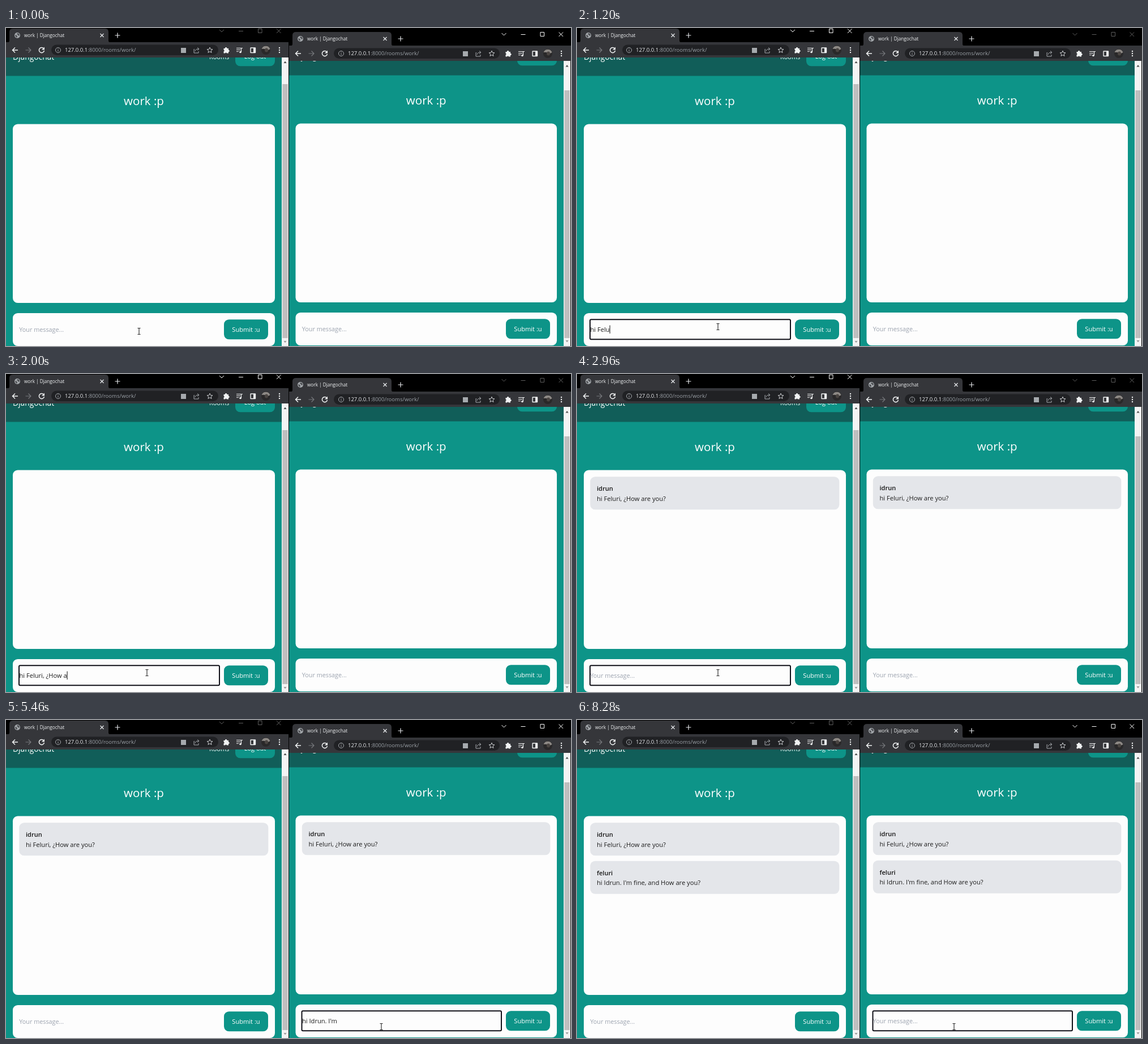
Write an HTML page that moves like this. It is 998 px wide and 561 px high and loops after 8.38 s.

```html
<!DOCTYPE html>
<html lang="en">
<head>
<meta charset="utf-8">
<title>Two chat windows</title>
<style>
  html, body { margin: 0; width: 100%; height: 100%; overflow: hidden; background: #000; }
  svg { display: block; width: 998px; height: 561px; }
  text { font-family: "Open Sans", "Noto Sans", sans-serif; white-space: pre; }
  .line { fill: none; stroke: currentColor; stroke-width: 1.2; }
</style>
</head>
<body>
<svg id="stage" viewBox="0 0 998 561" xmlns="http://www.w3.org/2000/svg"></svg>
<script>
const LOOP = 8380, BLINK = 225;
const TEAL = '#0d9488', DARK = '#115e59', PAPER = '#fdfdfd', BAR = '#35363a';
const LEFT_FOCUS = 360, RIGHT_FOCUS = 3540;

const messages = [
  { at: 2700, name: 'idrun', body: 'hi Feluri, ¿How are you?' },
  { at: 7600, name: 'feluri', body: "hi Idrun. I'm fine, and How are you?" }
];

// Typing bursts: first key, last key, characters
const leftKeys = [[640, 780, 'hi '], [920, 1460, 'Feluri, '], [1640, 2480, '¿How are you?']];
const rightKeys = [[3680, 3840, 'hi '], [4400, 4400, 'I'], [4740, 5220, "drun. I'm"], [5500, 5560, ' f'],
  [5620, 5900, 'ine'], [6320, 6490, ', and '], [6680, 7480, 'How are you?']];

const pointer = [[0, 235, 535], [120, 235, 535], [340, 249, 527], [3000, 249, 527],
  [3480, 663, 541], [7520, 663, 541], [7600, 666, 541]];

const rect = (x, y, w, h, fill, r = 0, more = '') =>
  `<rect x="${x}" y="${y}" width="${w}" height="${h}" rx="${r}" fill="${fill}" ${more}/>`;
const text = (x, y, size, fill, str, more = '') =>
  `<text x="${x}" y="${y}" font-size="${size}" fill="${fill}" ${more}>${str}</text>`;
const line = (d, more = '') => `<path class="line" d="${d}" ${more}/>`;
const group = (x, y, inner, more = '') => `<g transform="translate(${x} ${y})" ${more}>${inner}</g>`;

function chromeLeft(pillX, pillW) {
  return `<path d="M4 25Q6 25 6 22V7Q6 1 12 1H175Q181 1 181 7V22Q181 25 183 25Z" fill="${BAR}"/>` +
    '<circle cx="20" cy="13" r="5" fill="#a3a7ab"/>' +
    '<path d="M16 12l3 1 1 2-1 2q-3-2-3-5zM20 9l3 1 1 3-2 1-1-2-2-1z" fill="#4b4d51"/>' +
    text(32, 16, 8.2, '#f1f3f4', 'work | Djangochat') +
    line('M166.500 10l6 6m0-6l-6 6M192.500 13h9M197 8.500v9', 'color="#e8eaed"') +
    line('M21 39H11.500M16 34.500L11.500 39l4.500 4.500', 'color="#f1f3f4" style="stroke-width:1.5"') +
    line('M34.500 39H44M39.500 34.500L44 39l-4.500 4.500', 'color="#77797d"') +
    line('M66.500 36A4.600 4.600 0 1 0 67.500 40', 'color="#f1f3f4" style="stroke-width:1.5"') +
    '<path d="M68 33.500v5h-5z" fill="#f1f3f4"/>' +
    rect(pillX, 29.500, pillW, 18.500, '#202124', 9.250) +
    line('M87.500 39a4.500 4.500 0 1 0 9 0a4.500 4.500 0 1 0 -9 0M92 38.500v3M92 36v1.200', 'color="#a6aaae" style="stroke-width:1"') +
    text(104, 42.300, 9.5, '#e8eaed', '127.0.0.1<tspan fill="#9aa0a6">:8000/rooms/work/</tspan>');
}

function starPath(cx, cy) {
  const pts = Array.from({ length: 10 }, (_, i) => {
    const r = i % 2 ? 2.3 : 5.2, a = (i / 5 - 0.5) * Math.PI;
    return `${cx + r * Math.cos(a)} ${cy + r * Math.sin(a)}`;
  });
  return `M${pts.join('L')}Z`;
}

const chromeRight =
  rect(309, 35, 9, 9, '#a6aaae') +
  line('M333 37.500h-1v6.500h8v-3M334 41q.5-4 6-4M338 34.500l3 2.500-3 2.500', 'color="#a6aaae" style="stroke-width:1"') +
  line(starPath(360, 39.300), 'color="#c8cacd" style="stroke-width:1"') +
  '<path d="M384.500 36h2.500a1.700 1.700 0 1 1 3.300 0h2.700v2.700a1.700 1.700 0 1 1 0 3.400V44.500h-3a1.600 1.600 0 0 0-3 0h-2.500v-3a1.600 1.600 0 0 0 0-3z" fill="#f1f3f4"/>' +
  line('M407 35.500h8M407 38.500h7M407 41.500h4M415.500 42.500V35.500h2.500', 'color="#f1f3f4"') +
  '<circle cx="414" cy="42.500" r="1.800" fill="#f1f3f4"/>' +
  rect(432, 35, 8.5, 8.5, 'none', 0.5, 'stroke="#f1f3f4" stroke-width="1.400"') + rect(437, 35, 3.5, 8.5, '#f1f3f4') +
  '<circle cx="459" cy="39" r="8" fill="#292829"/><path d="M451.500 37a8 8 0 0 1 15 0q-3 3-7 1t-8-1z" fill="#8d8985"/>' +
  '<ellipse cx="460" cy="39" rx="3" ry="3.500" fill="#4a4542"/>' +
  [35, 39, 43].map(y => `<circle cx="483" cy="${y}" r="1.200" fill="#f1f3f4"/>`).join('');

const controls = line('M377 3l4 4 4-4M411 5.500h8M445.500 1.500h6.500v7h-6.500zM478 1.500l7.500 7.500m0-7.500L478 9', 'style="stroke-width:1"');

function scrollbar(x, top, thumbTop, arrowUp, arrowDown, w) {
  return rect(x, top, w, 561 - top, '#f4f4f4') + rect(x + 1.3, thumbTop, 9.5, 547 - thumbTop, '#bfbfbf') +
    `<path d="M${x + 3.5} ${arrowUp + 2}h5l-2.500-3.500z" fill="#4a4a4a"/>` +
    `<path d="M${x + 3.5} ${arrowDown - 2}h5l-2.500 3.500z" fill="#9a9a9a"/>`;
}

function page(id, x, w, dy, top) {
  const right = x + w, card = (m, i) => {
    const y = 181.3 + i * 67.5;
    return `<g id="${id}card${i}">` + rect(x + 11.3, y, w - 23, 58, '#e4e6ea', 8.7) +
      text(x + 23, y + 25, 11, '#151515', m.name, 'font-weight="600"') +
      text(x + 23, y + 42.3, 11.15, '#1c1c1c', m.body) + '</g>';
  };
  return group(0, dy,
    rect(x - 12, 50, w + 24, 512, TEAL) + rect(x - 12, 50, w + 24, 34.5, DARK) +
    text(x, 55.8, 13.8, '#fff', 'Djangochat') + text(right - 116, 54.5, 10.9, '#fff', 'Rooms') +
    rect(right - 70, 32, 70, 35.3, TEAL, 8.7) + text(right - 35, 54, 11, '#fff', 'Log out', 'text-anchor="middle"') +
    text(x + w / 2, 136, 20.5, '#fff', 'work :p', 'text-anchor="middle"') +
    rect(x, 169.5, w, 315.5, PAPER, 8.7) + messages.map(card).join('') +
    rect(x, 503, w, 58, PAPER, 8.7) +
    rect(right - 90, 514.3, 78, 35, TEAL, 8.7) +
    text(right - 51, 536, 11.1, '#fff', 'Submit :u', 'text-anchor="middle"') +
    text(x + 11.3, 536, 10.8, '#9ca3af', 'Your message...', `id="${id}hint"`) +
    text(x + 11.5, 536, 11.1, '#1c1c1c', '', `id="${id}typed"`) +
    rect(x + 11, 514.3, w - 109, 35, 'none', 2, `id="${id}ring" stroke="#101018" stroke-width="2"`) +
    rect(0, 524.5, 1, 14.5, '#111', 0, `id="${id}caret"`),
    '') + '';
}

document.getElementById('stage').innerHTML =
  '<defs><clipPath id="clipL"><rect y="52" width="499" height="509"/></clipPath>' +
  '<clipPath id="clipR"><rect x="500" y="58" width="498" height="503"/></clipPath></defs>' +
  rect(0, 0, 998, 561, '#000') +
  rect(0, 25, 499, 27.3, BAR) + chromeLeft(80, 295) + chromeRight + group(0, 0, controls, 'id="Lctl"') +
  '<g clip-path="url(#clipL)">' + page('L', 12, 463, 0, 52) + '</g>' + scrollbar(487, 52, 99, 60, 554, 12) +
  rect(500, 31, 498, 27.3, BAR) + group(500, 6, chromeLeft(79, 293)) + group(498, 6, chromeRight) +
  group(498.5, 6, controls, 'id="Rctl"') +
  '<g clip-path="url(#clipR)">' + page('R', 511.5, 461.5, -1, 58) + '</g>' + scrollbar(985, 58, 110, 66.5, 553, 12) +
  '<g id="tip"><path d="M100 477H153q3 0 3 3v23.500q0 3-3 3H118l-6 5.500-6-5.500h-6q-3 0-3-3V480q0-3 3-3z" fill="#4a5558"/>' +
  text(105, 495, 8.8, '#e4ecec', 'hello :D') + '</g>' +
  '<g id="mouse">' + line('M-2.500-5.500H-.8L0-5 .8-5.500H2.500M0-5V5M-2.500 5.500H-.8L0 5 .8 5.500H2.500', 'color="#222" style="stroke-width:1.100"') + '</g>';

const el = Object.fromEntries([...document.querySelectorAll('svg [id]')].map(n => [n.id, n]));
const show = (node, on) => node.setAttribute('visibility', on ? 'visible' : 'hidden');

function typedAt(keys, t) {
  let str = '', last = 0;
  for (const [from, to, chars] of keys) {
    if (t < from) break;
    const gap = chars.length > 1 ? (to - from) / (chars.length - 1) : 1;
    const n = Math.min(chars.length, Math.floor((t - from) / gap + 1e-6) + 1);
    str += chars.slice(0, n);
    last = from + (n - 1) * gap;
  }
  return { str, last };
}

function drawInput(id, x, keys, focusAt, blurAt, sentAt, t) {
  const focused = t >= focusAt && t < blurAt;
  let { str, last } = typedAt(keys, t);
  if (t >= sentAt) { str = ''; last = sentAt; }
  el[id + 'typed'].textContent = str;
  show(el[id + 'hint'], !str);
  show(el[id + 'ring'], focused);
  const idle = t - Math.max(last, focusAt);
  show(el[id + 'caret'], focused && Math.floor(idle / BLINK) % 2 === 0);
  const width = str ? el[id + 'typed'].getComputedTextLength() : 0;
  el[id + 'caret'].setAttribute('x', x + width);
}

function pointerAt(t) {
  const i = pointer.findIndex(p => p[0] > t);
  if (i < 0) return pointer[pointer.length - 1].slice(1);
  const a = pointer[i - 1], b = pointer[i], k = (t - a[0]) / (b[0] - a[0]);
  const e = k * k * (3 - 2 * k);
  return [a[1] + (b[1] - a[1]) * e, a[2] + (b[2] - a[2]) * e];
}

function draw(t) {
  const leftOn = t >= LEFT_FOCUS && t < RIGHT_FOCUS;
  el.Lctl.setAttribute('color', leftOn ? '#fff' : '#5c5c5c');
  el.Rctl.setAttribute('color', leftOn ? '#5c5c5c' : '#fff');
  messages.forEach((m, i) => ['L', 'R'].forEach(id => show(el[id + 'card' + i], t >= m.at)));
  drawInput('L', 23.5, leftKeys, LEFT_FOCUS, RIGHT_FOCUS, messages[0].at, t);
  drawInput('R', 523, rightKeys, RIGHT_FOCUS, LOOP, messages[1].at, t);
  const fade = Math.min((t - 660) / 60, (880 - t) / 130, 0.9);
  el.tip.setAttribute('opacity', Math.max(0, fade));
  const [mx, my] = pointerAt(t);
  el.mouse.setAttribute('transform', `translate(${mx.toFixed(1)} ${my.toFixed(1)})`);
}

function tick() {
  draw(performance.now() % LOOP);
  requestAnimationFrame(tick);
}
tick();
</script>
</body>
</html>
```
